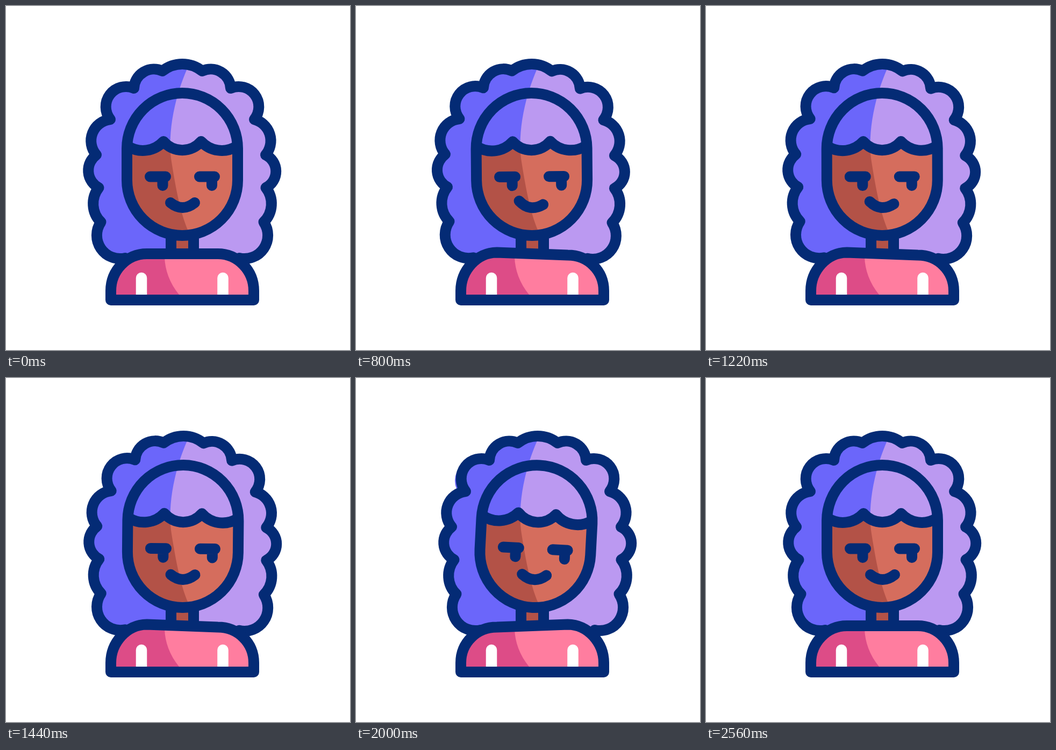
These frames come from a looping animation (640x640 px, 2.6 s). An HTML page with a canvas:

```html
<!DOCTYPE html>
<html lang="en">
<head>
<meta charset="utf-8">
<title>Shoulder shimmy</title>
<style>
html, body { margin: 0; width: 100%; height: 100%; overflow: hidden; background: #fff; }
canvas { display: block; width: 640px; height: 640px; }
</style>
</head>
<body>
<canvas id="stage" width="640" height="640"></canvas>
<script>
const ctx = document.getElementById('stage').getContext('2d');
const LOOP = 2600, STEP = 20, TAU = Math.PI * 2;
const INK = '#042b75';
const HAIR = ['#6b66fa', '#bb99f1'];
const SKIN = ['#b35247', '#d56d5d'];
const DRESS = ['#dd4c87', '#ff7d9f'];

const hairLine = 'M222 469A43.5 43.5 0 0 1 176.5 402A48 48 0 0 1 172.5 338' +
  'A36 36 0 0 1 168 277A40 40 0 0 1 194 211A37.5 37.5 0 0 1 238 153' +
  'A37.3 37.3 0 0 1 291 121A59 59 0 0 1 365 121A37.3 37.3 0 0 1 418 153' +
  'A37.5 37.5 0 0 1 462 211A41 41 0 0 1 483 277A34 34 0 0 1 483.5 338' +
  'A48 48 0 0 1 479.5 402A43.5 43.5 0 0 1 434 469';
const fringeLine = 'M227 261A52 52 0 0 0 293 252A46 46 0 0 0 363 252A52 52 0 0 0 429 261';

const hair = new Path2D(hairLine);
const face = new Path2D('M225 265a103 103 0 0 1 206 0V324a103 103 0 0 1 -206 0Z');
const fringe = new Path2D(fringeLine);
const fringeArea = new Path2D(fringeLine + 'V150H227Z');
const eyes = new Path2D('M268 317.5H297M291.5 318V334M360 317.5H388M383 318V334');
const smile = new Path2D('M306 366Q328.5 384 351 366');
const neck = new Path2D('M307 425V465M349 425V465');
const sleeves = new Path2D('M252 506V545M403.5 506V545');
const headLight = new Path2D('M341 90V108C312 170 300 240 308 290S325 390 342 425V640H640V90Z');
const dressLight = new Path2D('M295 440V466Q296 505 322 537V560H640V440Z');

// time, hair shift, hair turn, face turn, smile turn, shimmy size, hair swing
const poses = [
  [0, 0, 0, 0, 0, 0, 0],
  [200, -2.3, .43, -.5, 9, 1, 2.4],
  [1060, -2.3, .43, -.5, 9, 1, 2.4],
  [1440, 1, .43, .5, 0, 1, 1.4],
  [1620, 3, .2, 1, 0, 1, 1],
  [2000, 10, 0, 3, 0, 1, .6],
  [2170, 3, 0, 1, 0, 1, .6],
  [2320, -1.2, 0, -.3, 0, .6, .6],
  [2560, 0, 0, 0, 0, 0, 0],
  [LOOP, 0, 0, 0, 0, 0, 0]
];
const beats = [[0, 0], [1000, 5], [1440, 7], [2000, 9.5], [2560, 12], [LOOP, 12]];

const smooth = u => u * u * (3 - 2 * u);

function sample(rows, t, ease) {
  let i = 0;
  while (i < rows.length - 2 && t >= rows[i + 1][0]) i++;
  const a = rows[i], b = rows[i + 1];
  const u = ease((t - a[0]) / (b[0] - a[0]));
  return a.slice(1).map((v, k) => v + (b[k + 1] - v) * u);
}

function turn(deg, x, y, dx = 0) {
  ctx.translate(x + dx, y);
  ctx.rotate(deg * Math.PI / 180);
  ctx.translate(-x, -y);
}

function within(setup, draw) {
  ctx.save();
  setup();
  draw();
  ctx.restore();
}

function line(path, color = INK, width = 20) {
  ctx.strokeStyle = color;
  ctx.lineWidth = width;
  ctx.stroke(path);
}

// The two-tone split stays put while the clipping shape moves.
function twoTone(colors, light) {
  ctx.resetTransform();
  ctx.fillStyle = colors[0];
  ctx.fillRect(0, 0, 640, 640);
  ctx.fillStyle = colors[1];
  ctx.fill(light);
}

function drawHair(pose) {
  ctx.fillStyle = HAIR[0];
  ctx.beginPath();
  ctx.arc(223, 191, 39, 0, TAU);
  ctx.fill();
  within(() => { pose(); ctx.clip(hair); }, () => twoTone(HAIR, headLight));
  within(pose, () => line(hair));
}

function drawNeck() {
  ctx.fillStyle = SKIN[0];
  ctx.fillRect(307, 425, 42, 40);
  line(neck);
}

function drawFace(pose, smileTurn) {
  within(() => { pose(); ctx.clip(face); }, () => twoTone(SKIN, headLight));
  within(() => { pose(); ctx.clip(face); ctx.clip(fringeArea); }, () => twoTone(HAIR, headLight));
  within(pose, () => {
    line(fringe);
    line(face);
    line(eyes);
    turn(smileTurn, 328.5, 368, -smileTurn * .27);
    line(smile);
  });
}

function drawBody(tilt) {
  const l = 461 - 2.6 * tilt, r = 461 + 2.6 * tilt;
  const body = new Path2D(`M195 547V530C195 492 225 ${l} 262 ${l}L394 ${r}C431 ${r} 461 492 461 530V547Z`);
  within(() => ctx.clip(body), () => twoTone(DRESS, dressLight));
  line(sleeves, '#fff', 20.5);
  line(body);
}

function render(t) {
  const [shift, hairTurn, faceTurn, smileTurn, size, swing] = sample(poses, t, smooth);
  const beat = sample(beats, t, u => u)[0] * TAU;
  ctx.resetTransform();
  ctx.fillStyle = '#fff';
  ctx.fillRect(0, 0, 640, 640);
  ctx.lineCap = ctx.lineJoin = 'round';
  drawHair(() => turn(hairTurn, 328, 307, shift - swing * Math.sin(beat)));
  drawNeck();
  drawFace(() => turn(faceTurn, 328, 427), smileTurn);
  drawBody(size * Math.cos(beat));
}

const start = performance.now();
function tick() {
  const t = (performance.now() - start) % LOOP;
  render(Math.floor(t / STEP) * STEP);
  requestAnimationFrame(tick);
}
tick();
</script>
</body>
</html>
```
